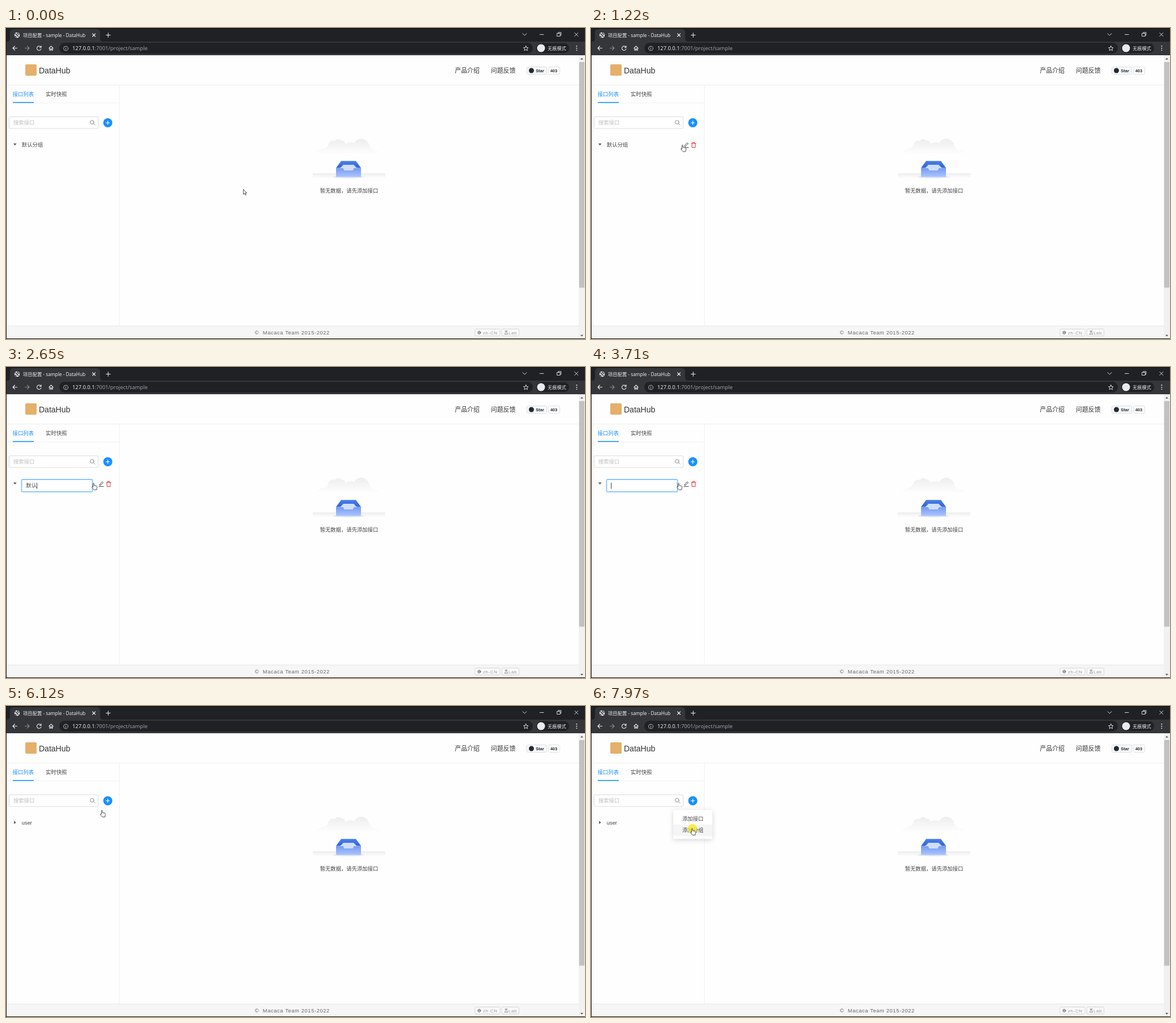
Animation, 1021 px wide and 548 px high, one loop 8000 ms. Source, as an HTML page:

```html
<!DOCTYPE html>
<html lang="zh">
<head>
<meta charset="utf-8">
<title>DataHub</title>
<style>
  html, body { margin: 0; width: 100%; height: 100%; overflow: hidden; background: #fefefe; }
  svg { display: block; width: 1021px; height: 548px; }
  text { font: 9.33px "Liberation Sans", Arial, "Noto Sans CJK SC", "Noto Sans CJK", sans-serif; fill: #444; white-space: pre; }
  .ui { font-family: "Noto Sans", "Noto Sans CJK SC", "Noto Sans CJK", sans-serif; fill: #e8eaed; }
  .nav { font-size: 10.9px; fill: #333; }
  .gh { font-size: 7.5px; font-weight: bold; fill: #24292e; }
  .foot { fill: #666; letter-spacing: .62px; }
  .tag { font-size: 8px; fill: #999; letter-spacing: .6px; }
  .line { fill: none; stroke-linecap: round; stroke-linejoin: round; }
  #menu { transform-origin: 145px 183px; }
  #menu .panel { filter: drop-shadow(0 2px 4px rgba(0,0,0,.16)); }
</style>
</head>
<body>
<svg viewBox="0 0 1021 548">
  <defs>
    <linearGradient id="cloud" x2="0" y2="1"><stop stop-color="#ededef"/><stop offset="1" stop-color="#fefefe"/></linearGradient>
    <linearGradient id="tray" x2="0" y2="1"><stop stop-color="#7599f2"/><stop offset="1" stop-color="#aac5ff"/></linearGradient>
    <linearGradient id="lid" x2="0" y2="1"><stop stop-color="#4a80ea"/><stop offset="1" stop-color="#3263d8"/></linearGradient>
  </defs>

  <!-- browser frame -->
  <path fill="#202124" d="M0 0H1021V24H0Z"/>
  <path fill="#35363a" d="M1 24H2Q7 24 7 19V8Q7 2 13 2H160Q166 2 166 8V19Q166 24 171 24H1021V48H1Z"/>
  <circle cx="19.5" cy="12.5" r="4.8" fill="#e8eaed"/>
  <path class="line" stroke="#35363a" stroke-width="1.5" d="M16 10.5Q19 10 19 12T22 14.5M20.5 8.5Q20 11 23 11M16 14L18 16"/>
  <text class="ui" x="30" y="16" style="font-size:8.3px">项目配置 - sample - DataHub</text>
  <g class="line" stroke="#e8eaed" stroke-width="1.1">
    <path d="M152.5 10L157.5 15M157.5 10L152.5 15M176.5 12.5H184M180.2 8.7V16.3"/>
    <path d="M19.5 35.5H12M15.5 32L12 35.5L15.5 39"/>
    <path stroke="#85878b" d="M33.5 35.5H41M37.5 32L41 35.5L37.5 39"/>
    <path d="M61.2 33.2A3.8 3.8 0 1 0 62 36.5M62 31.5V34.2H59.2"/>
    <path d="M75.8 35.7L79.5 32L83.2 35.7M77 35.3V39.3H78.6V36.8H80.6V39.3H82V35.3"/>
    <path stroke-width=".9" d="M911 9.8L914.5 13L918 9.8M941.5 11.5H948M972 9.5H977.2V14.5H972ZM973.8 9.3V7.8H978.8V12.8H977.4M1002.8 8.5L1008.8 14.5M1008.8 8.5L1002.8 14.5"/>
  </g>
  <rect x="94" y="26" width="835" height="19" rx="9.5" fill="#202124"/>
  <g class="line" stroke="#aeb1b6" stroke-width="1"><circle cx="105.5" cy="36" r="3.9"/><path d="M105.5 35.7V38M105.5 33.9V34"/></g>
  <text class="ui" x="117" y="39">127.0.0.1<tspan fill="#9aa0a6">:7001/project/sample</tspan></text>
  <path class="line" stroke="#d5d7da" d="M916.8 31.5L918 34.4L921 34.7L918.8 36.7L919.5 39.8L916.8 38.2L914.1 39.8L914.8 36.7L912.6 34.7L915.6 34.4Z"/>
  <rect x="935" y="27" width="58" height="17" rx="8.5" fill="#202124"/>
  <circle cx="943.5" cy="35.5" r="7" fill="#e8eaed"/>
  <text class="ui" x="955" y="38.8" style="font-size:8.2px">无痕模式</text>
  <path fill="#e8eaed" d="M1005.5 31h1.7v1.7h-1.7zM1005.5 34.7h1.7v1.7h-1.7zM1005.5 38.4h1.7v1.7h-1.7z"/>

  <!-- page header -->
  <rect x="34" y="64" width="20" height="20" rx="2" fill="#e5b06a"/>
  <text x="58" y="79.5" style="font-size:14px;fill:#333">DataHub</text>
  <text class="nav" x="791.5" y="79">产品介绍</text>
  <text class="nav" x="855" y="79">问题反馈</text>
  <g fill="#f6f8fa" stroke="#d5d8da" stroke-width=".8">
    <rect x="918.5" y="68.5" width="35" height="13" rx="2"/>
    <rect x="956.5" y="68.5" width="20" height="13" rx="2" fill="#fff"/>
  </g>
  <circle cx="926.5" cy="75" r="4.5" fill="#24292e"/>
  <text class="gh" x="934.3" y="77.7">Star</text>
  <text class="gh" x="959.7" y="77.7">403</text>
  <path fill="none" stroke="#efefef" d="M1 100.5H1010M200 101V525M1 132H200"/>

  <!-- sidebar -->
  <text x="11.7" y="119.6" style="fill:#1890ff">接口列表</text>
  <text x="70" y="119.6">实时快照</text>
  <rect x="12" y="130.5" width="37" height="1.6" fill="#1890ff"/>
  <rect x="5.5" y="156.5" width="157" height="20.5" rx="1.5" fill="#fff" stroke="#d9d9d9" stroke-width=".9"/>
  <text x="13" y="170" style="fill:#bfbfbf">搜索接口</text>
  <g class="line" stroke="#8c8c8c"><circle cx="151.8" cy="166" r="3.3"/><path d="M154.3 168.5L157 171.2"/></g>
  <circle cx="179.5" cy="167" r="8" fill="#1890ff"/>
  <path stroke="#fff" stroke-width="1.2" d="M176 167H183M179.5 163.5V170.5"/>

  <path id="twist" fill="#555" d="M12.9 203.6H18.7L15.8 207.1Z"/>
  <text id="label" x="27.8" y="208.6"></text>
  <g id="edit">
    <rect id="glow" x="27.2" y="197.7" width="125.6" height="22.6" rx="2" fill="none" stroke="#1890ff" stroke-width="1.5" opacity=".3"/>
    <rect x="27.8" y="198.5" width="124.4" height="21.2" rx="1.6" fill="#fff" stroke="#52b0ff" stroke-width=".9"/>
    <text id="value" x="35.3" y="212.2"></text>
    <rect id="caret" y="204" width=".9" height="10.5" fill="#222"/>
  </g>
  <g id="tools" class="line" stroke-width="1">
    <path stroke="#444" d="M163.8 210.6H172M165.2 208.3L165.6 206.3L169.8 202.1L171.4 203.7L167.2 207.9Z"/>
    <path stroke="#e6323a" d="M177 203.3H185M179.4 203V201.6H182.6V203M178 203.5V210.5H184V203.5"/>
  </g>

  <!-- empty state -->
  <path fill="url(#cloud)" d="M546 222Q552 213 562 212Q567 211 569 203Q573 197 580 199Q584 193 591 198Q597 198 599 204Q606 199 614 203Q618 195 627 195Q638 196 641 208Q644 215 652 216Q658 217 661 222Z"/>
  <rect x="541" y="256" width="128" height="9" fill="url(#cloud)"/>
  <ellipse cx="604" cy="262.5" rx="28" ry="2.2" fill="#e4e6ec"/>
  <path fill="url(#lid)" d="M591 234.3H617L626 246.5H582Z"/>
  <path fill="url(#tray)" d="M582 246.3H626V261Q626 262.5 624.5 262.5H583.5Q582 262.5 582 261Z"/>
  <path fill="#cfdefc" d="M595 241H613L619 247H613.5L611.5 251H596.5L594.5 247H589Z"/>
  <text x="605" y="289.6" text-anchor="middle">暂无数据，请先添加接口</text>

  <!-- footer and scrollbar -->
  <path fill="#f6f6f6" d="M1 525H1010V547H1Z"/>
  <path stroke="#e6e6e6" d="M1 525H1010"/>
  <text class="foot" x="438.8" y="540">©</text>
  <text class="foot" x="452.8" y="540">Macaca Team 2015-2022</text>
  <g fill="#fafafa" stroke="#d0d0d0" stroke-width=".8">
    <rect x="827" y="530.5" width="44" height="12" rx="1.5"/>
    <rect x="874.5" y="530.5" width="30" height="12" rx="1.5"/>
  </g>
  <g class="line" stroke="#777" stroke-width=".8">
    <circle cx="834.5" cy="536.8" r="2.7"/><ellipse cx="834.5" cy="536.8" rx="1.2" ry="2.7"/><path d="M832 536.8H837"/>
    <path d="M880 534H884M881 534V536.5L879.3 539.6H884.7L883 536.5V534"/>
  </g>
  <text class="tag" x="841" y="539.7">zh-CN</text>
  <text class="tag" x="886" y="539.7">Lab</text>
  <path fill="#f1f1f1" d="M1010 48H1021V547H1010Z"/>
  <path fill="#c1c1c1" d="M1010.7 60H1020V457.5H1010.7Z"/>
  <path fill="#555" d="M1012.8 55.6H1018L1015.4 52.8ZM1012.8 540.8H1018L1015.4 543.6Z"/>
  <path fill="#111" d="M0 0H1021V1H1V547H1021V548H0Z"/>

  <g id="menu">
    <rect class="panel" x="145" y="183.3" width="69" height="51" rx="1.3" fill="#fff"/>
    <rect id="hover" x="145" width="69" height="20.5" fill="#f5f5f5"/>
    <text x="161" y="201.9">添加接口</text>
    <text x="161" y="222.2">添加分组</text>
  </g>

  <circle id="click" r="8.3" fill="#f7ea1e" opacity=".78"/>
  <g id="pointer" fill="#fff" stroke="#222" stroke-width=".8" stroke-linejoin="round">
    <path id="arrow" d="M.6 .4V9L2.6 7.2L4 10.4L5.4 9.8L4 6.7H6.6Z"/>
    <path id="hand" d="M2.5 7.8V1.3Q3.4 -.3 4.3 1.3V4.8L8.3 5.5Q9.7 5.9 9.5 7.6L8.7 12.4H4.2L.8 8.6Q.2 7 1.5 6.9Z"/>
  </g>
</svg>
<script>
const $ = id => document.getElementById(id);
const [twist, label, edit, glow, value, caret, tools, menu, hover, click, pointer, arrow, hand] =
  ['twist', 'label', 'edit', 'glow', 'value', 'caret', 'tools', 'menu', 'hover', 'click', 'pointer', 'arrow', 'hand'].map($);

const LOOP = 8000;
const NAME = '默认分组';

// Pointer moves: first and last tick, number of ticks, evenly timed waypoints.
const moves = [
  [190, 940, 12, [[418, 284], [392, 293], [300, 284], [200, 255], [140, 229], [138, 216], [144, 207]]],
  [1010, 1290, 5, [[144, 207], [152, 206], [162, 205]]],
  [1490, 1840, 6, [[162, 205], [162, 205], [162, 205], [159, 204], [155, 204], [152, 204], [151, 204]]],
  [5850, 6600, 12, [[151, 204], [156, 196], [165, 184], [174, 174], [180, 169], [181, 169]]],
  [6670, 6890, 4, [[181, 169], [181, 169], [185, 178], [188, 187], [187, 194]]],
  [7220, 7640, 7, [[187, 194], [184, 199], [178, 210], [175, 215]]]
];
const typing = [[0, NAME], [2520, '默认分'], [2650, '默认'], [2850, '默'], [3180, ''], [4170, 'u'], [4240, 'us'], [4390, 'user']];

const clamp = v => Math.max(0, Math.min(1, v));
const within = (t, a, b) => t >= a && t < b;
const show = (el, on) => { el.style.display = on ? '' : 'none'; };
const write = (el, s) => { if (el.textContent !== s) el.textContent = s; };

function pointerAt(t) {
  const move = moves.filter(m => t >= m[0]).pop();
  if (!move) return moves[0][3][0];
  const [start, end, ticks, path] = move;
  const tick = Math.min(ticks, 1 + Math.floor((t - start) / (end - start) * (ticks - 1) + .05));
  const pos = tick / ticks * (path.length - 1);
  const i = Math.min(path.length - 2, Math.floor(pos));
  return path[i].map((v, k) => v + (path[i + 1][k] - v) * (pos - i));
}

function draw(t) {
  const [x, y] = pointerAt(t);
  const onRow = within(t, 870, 6080);
  pointer.setAttribute('transform', `translate(${x} ${y})`);
  show(arrow, t < 870);
  show(hand, t >= 870);
  show(tools, onRow);

  const editing = within(t, 1560, 4920);
  show(edit, editing);
  show(label, !editing);
  write(label, t < 4985 ? NAME : 'user');
  twist.setAttribute('transform', `rotate(${-90 * clamp((t - 4890) / 220)} 15.8 205.2)`);
  if (editing) {
    write(value, typing.filter(k => t >= k[0]).pop()[1]);
    caret.setAttribute('x', 35.3 + (value.textContent ? value.getComputedTextLength() : 0));
    show(caret, !within(t, 2100, 2520) && !within(t, 3310, 3710));
    glow.setAttribute('opacity', .35 * clamp((t - 1560) / 300));
  }

  const open = clamp((t - 6400) / 200);
  show(menu, open > 0);
  menu.style.opacity = open;
  menu.style.transform = `scaleY(${.8 + .2 * open})`;
  show(hover, t > 6670 && y >= 188);
  hover.setAttribute('y', y < 209 ? 188 : 208.7);

  show(click, within(t, 1490, 1560) || t >= 7970);
  click.setAttribute('cx', x + 3.7);
  click.setAttribute('cy', y + 1.3);
}

const t0 = performance.now();
function loop() {
  draw((performance.now() - t0) % LOOP);
  requestAnimationFrame(loop);
}
loop();
</script>
</body>
</html>
```
